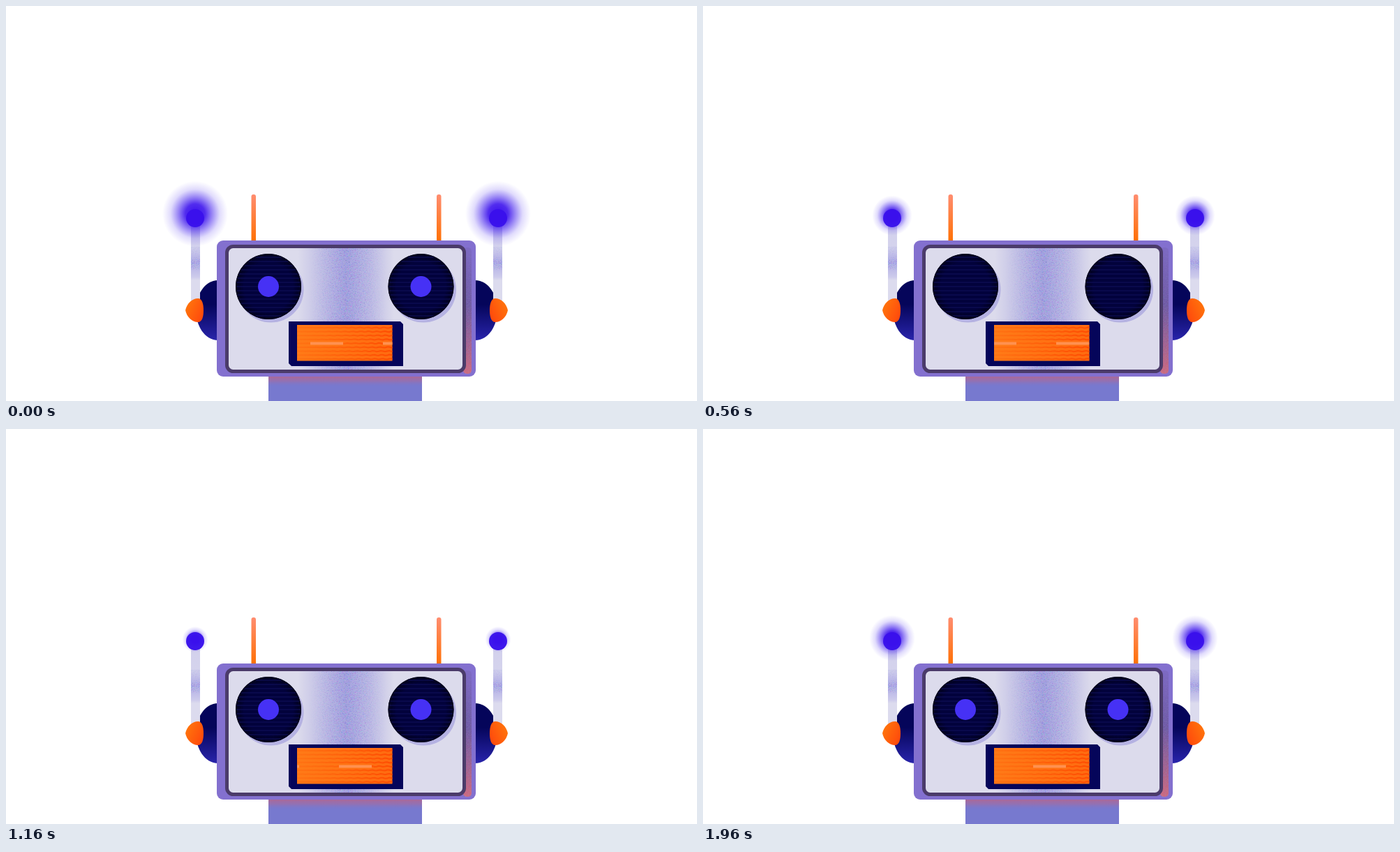
These frames come from a looping animation (990x566 px, 2 s). An HTML page:

```html
<!DOCTYPE html>
<html lang="en">
<head>
<meta charset="utf-8">
<title>Robot</title>
<style>
html, body { margin: 0; width: 100%; height: 100%; overflow: hidden; background: #fff; }
svg { display: block; width: 990px; height: 566px; }
</style>
</head>
<body>
<svg viewBox="0 0 990 566" xmlns="http://www.w3.org/2000/svg">
  <defs>
    <filter id="grain" x="0" y="0" width="1" height="1" color-interpolation-filters="sRGB">
      <feTurbulence type="fractalNoise" baseFrequency=".7" numOctaves="2" seed="4"/>
      <feColorMatrix values="1 0 0 0 .08  0 1 0 0 .08  0 0 .6 0 .55  0 0 0 5 -2"/>
      <feComposite operator="in" in2="SourceGraphic"/>
    </filter>
    <linearGradient id="antenna" x2="0" y2="1">
      <stop stop-color="#ff8d70"/><stop offset="1" stop-color="#ff6f00"/>
    </linearGradient>
    <linearGradient id="ear" x2="0" y2="1">
      <stop offset=".4" stop-color="#05055a"/><stop offset="1" stop-color="#2924ab"/>
    </linearGradient>
    <linearGradient id="knob" x2="1" y2=".6">
      <stop stop-color="#ff7c0c"/><stop offset="1" stop-color="#ff4c0c"/>
    </linearGradient>
    <linearGradient id="sheen">
      <stop stop-color="#a5a2de" stop-opacity="0"/>
      <stop offset=".18" stop-color="#a5a2de" stop-opacity=".35"/>
      <stop offset=".5" stop-color="#a5a2de"/>
      <stop offset=".75" stop-color="#a5a2de" stop-opacity=".55"/>
      <stop offset="1" stop-color="#a5a2de" stop-opacity="0"/>
    </linearGradient>
    <linearGradient id="armShade" x2="0" y2="1">
      <stop stop-color="#a9a5e4" stop-opacity=".2"/>
      <stop offset=".3" stop-color="#a9a5e4" stop-opacity=".15"/>
      <stop offset=".5" stop-color="#a9a5e4" stop-opacity=".85"/>
      <stop offset=".68" stop-color="#a9a5e4" stop-opacity=".3"/>
      <stop offset=".72" stop-color="#a9a5e4" stop-opacity="0"/>
    </linearGradient>
    <linearGradient id="edge" x2="0" y2="1">
      <stop stop-color="#6c579e" stop-opacity=".25"/>
      <stop offset=".45" stop-color="#6c579e" stop-opacity=".9"/>
      <stop offset="1" stop-color="#d0687a"/>
    </linearGradient>
    <linearGradient id="neckShade" x2="0" y2="1">
      <stop stop-color="#b6658c" stop-opacity=".95"/>
      <stop offset=".5" stop-color="#a56ba0" stop-opacity=".6"/>
      <stop offset="1" stop-color="#7779cf" stop-opacity="0"/>
    </linearGradient>
    <linearGradient id="mouth">
      <stop stop-color="#ff7a17"/><stop offset="1" stop-color="#ff6b10"/>
    </linearGradient>
    <linearGradient id="ridge" gradientUnits="userSpaceOnUse" x1="417" x2="554">
      <stop stop-color="#ff5a06" stop-opacity=".25"/><stop offset="1" stop-color="#ff4800" stop-opacity=".9"/>
    </linearGradient>
    <radialGradient id="lens">
      <stop offset=".75" stop-color="#02023c"/><stop offset="1" stop-color="#01011c"/>
    </radialGradient>
    <radialGradient id="blueGlow">
      <stop stop-color="#3a10ec"/>
      <stop offset=".3" stop-color="#3a10ec" stop-opacity=".88"/>
      <stop offset=".5" stop-color="#3d18ec" stop-opacity=".55"/>
      <stop offset=".75" stop-color="#4a2cee" stop-opacity=".17"/>
      <stop offset="1" stop-color="#5a40f0" stop-opacity="0"/>
    </radialGradient>
    <radialGradient id="redGlow">
      <stop stop-color="#f0512b" stop-opacity=".97"/>
      <stop offset=".2" stop-color="#ea4f30" stop-opacity=".85"/>
      <stop offset=".45" stop-color="#e24a34" stop-opacity=".52"/>
      <stop offset=".72" stop-color="#ec6040" stop-opacity=".18"/>
      <stop offset="1" stop-color="#f47a58" stop-opacity="0"/>
    </radialGradient>
    <clipPath id="mouthClip"><rect x="417" y="457" width="136.5" height="51.5"/></clipPath>

    <g id="side">
      <path d="M304 393C284 393 272 415 272 436S284 479 304 479Z" fill="url(#ear)"/>
      <g class="arm">
        <rect x="265" y="308" width="13" height="118" fill="#dcdbee"/>
        <rect x="265" y="308" width="13" height="118" fill="url(#armShade)"/>
        <rect x="265" y="345" width="13" height="47" fill="url(#armShade)" filter="url(#grain)" opacity=".6"/>
        <circle cx="271" cy="304" r="13" fill="#3a10ec"/>
      </g>
      <circle class="blue" fill="url(#blueGlow)"/>
      <circle class="red" fill="url(#redGlow)"/>
      <path d="M257 436C259 426 267 419 275 419C281 419 283 427 283 436S281 453 275 453C267 453 259 446 257 436Z" fill="url(#knob)"/>
    </g>
    <g id="eye">
      <circle cx="3.5" cy="4.5" r="47" fill="#b5b2e2"/>
      <circle r="47" fill="url(#lens)"/>
      <g class="slats" stroke="#11105a" stroke-width="1.4" opacity=".75"/>
      <circle r="46.5" fill="none" stroke="#010118"/>
      <circle class="pupil" fill="#4631f5"/>
    </g>
  </defs>

  <use href="#side"/>
  <use href="#side" transform="matrix(-1 0 0 1 976 0)"/>

  <rect x="351.5" y="270" width="6.5" height="70" rx="3" fill="url(#antenna)"/>
  <rect x="617" y="270" width="6.5" height="70" rx="3" fill="url(#antenna)"/>

  <rect x="376" y="525" width="220" height="41" fill="#7779cf"/>
  <rect x="376" y="529" width="220" height="17" fill="url(#neckShade)"/>
  <rect x="302" y="336" width="371" height="195" rx="9" fill="#8370cf"/>
  <rect x="655" y="346" width="12" height="181" rx="5" fill="url(#edge)"/>
  <rect x="655" y="346" width="12" height="181" fill="url(#edge)" filter="url(#grain)" opacity=".18"/>
  <rect x="316.5" y="344.5" width="340" height="179" rx="9" fill="#dcdbec"/>
  <rect x="418" y="347" width="138" height="174" fill="url(#sheen)"/>
  <rect x="434" y="347" width="110" height="174" fill="url(#sheen)" filter="url(#grain)" opacity=".5"/>
  <rect x="316.5" y="344.5" width="340" height="179" rx="9" fill="none" stroke="#4b3b6a" stroke-width="5"/>

  <use href="#eye" x="376" y="402"/>
  <use href="#eye" x="594.5" y="402"/>

  <path d="M405 452H565L569 456V516H409L405 512Z" fill="#05055a"/>
  <g clip-path="url(#mouthClip)">
    <rect x="417" y="457" width="137" height="52" fill="url(#mouth)"/>
    <path id="ridges" fill="none" stroke="url(#ridge)" stroke-width="2"/>
    <g id="dashes" fill="#ff9150">
      <rect x="-104" y="481.5" width="47" height="4"/>
      <rect y="481.5" width="47" height="4"/>
      <rect x="104" y="481.5" width="47" height="4"/>
    </g>
  </g>
  <g id="stars" fill="#ff4f0c"></g>
</svg>
<script>
const LOOP = 2000, STEP = 40;
const $ = selector => document.querySelector(selector);
const make = (parent, tag, attrs) => {
  const node = document.createElementNS("http://www.w3.org/2000/svg", tag);
  for (const name in attrs) node.setAttribute(name, attrs[name]);
  return parent.appendChild(node);
};

// Eased value between [time, value] pairs.
function track(t, keys) {
  for (let i = 1; i < keys.length; i++) {
    const [a, from] = keys[i - 1], [b, to] = keys[i];
    if (t < b) {
      const p = Math.max(0, (t - a) / (b - a));
      return from + (to - from) * p * p * (3 - 2 * p);
    }
  }
  return keys[keys.length - 1][1];
}

for (let y = -42; y <= 42; y += 6) {
  const half = Math.sqrt(46 * 46 - y * y);
  make($(".slats"), "line", { x1: -half, x2: half, y1: y, y2: y });
}

let ridges = "";
for (let y = 461; y < 508; y += 5.6) {
  ridges += `M417 ${y}`;
  for (let x = 420; x <= 555; x += 3) {
    const wave = Math.sin(x * 0.55 + y) * (x - 417) / 190;
    ridges += `L${x} ${(y + wave).toFixed(2)}`;
  }
}
$("#ridges").setAttribute("d", ridges);

const starPoints = Array.from({ length: 10 }, (_, i) => {
  const r = i % 2 ? 0.5 : 1, a = (i * 36 - 82) * Math.PI / 180;
  return `${(r * Math.cos(a)).toFixed(3)},${(r * Math.sin(a)).toFixed(3)}`;
}).join(" ");
const stars = [
  { x: 322, y: 451, size: [[120, 0], [200, 18.5], [280, 0]] },
  { x: 621, y: 340, size: [[200, 0], [280, 19.5], [360, 0]] }
].map(star => ({ ...star, node: make($("#stars"), "polygon", { points: starPoints }) }));

const arm = $(".arm"), blue = $(".blue"), red = $(".red");
const pupil = $(".pupil"), dashes = $("#dashes");

function placeGlow(node, angle, r, lift, opacity) {
  const a = angle * Math.PI / 180;
  node.setAttribute("cx", 271 - 132 * Math.sin(a));
  node.setAttribute("cy", 436 - 132 * Math.cos(a) - lift);
  node.setAttribute("r", r);
  node.setAttribute("opacity", opacity);
}

function draw(t) {
  const angle = track(t, [[0, 0], [160, 10.5], [400, 0]]);
  arm.setAttribute("transform", `rotate(${-angle} 271 436)`);

  const idle = 18.5 + 11.5 * ((t - 1200) / 680) ** 2;
  const blueR = t < 560 ? track(t, [[0, 47], [160, 42], [280, 39], [560, 29]]) : idle;
  const blueAlpha = track(t, [[0, 1], [160, 0.35], [280, 0.8], [400, 1]]);
  placeGlow(blue, angle, blueR, blueR / 7.5, blueAlpha);

  const redR = track(t, [[0, 40], [160, 65], [280, 29], [400, 0]]);
  const redAlpha = track(t, [[0, 0], [160, 1]]);
  placeGlow(red, angle, redR, track(t, [[0, 6], [160, 11], [280, 5]]), redAlpha);

  pupil.setAttribute("r", track(t, [[0, 15], [160, 26], [280, 0], [1000, 0], [1160, 15]]));

  const offset = (19 + t * 0.125) % 104;
  dashes.setAttribute("transform", `translate(${417 + offset} 0)`);

  for (const { x, y, size, node } of stars)
    node.setAttribute("transform", `translate(${x} ${y}) scale(${track(t, size)})`);
}

function tick() {
  draw(Math.floor(performance.now() % LOOP / STEP) * STEP);
  requestAnimationFrame(tick);
}
tick();
</script>
</body>
</html>
```
